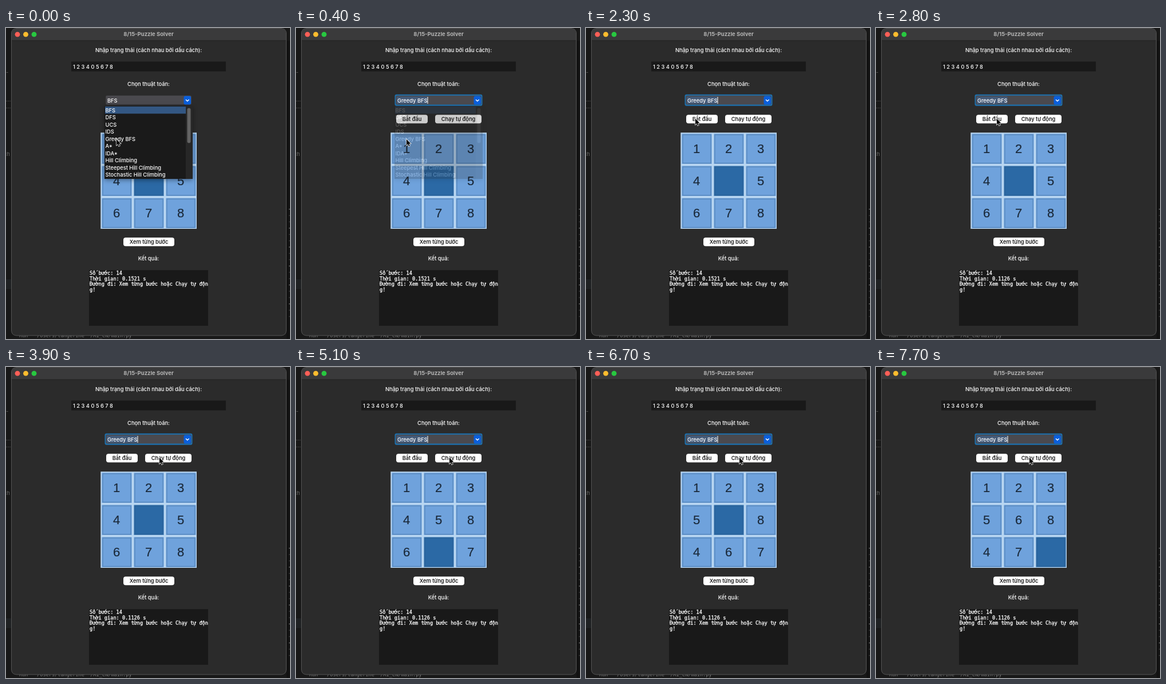
Recreate the animation shown at these times as an HTML page with a canvas. Size 496 by 542 pixels, loop 8 s.

```html
<!DOCTYPE html>
<html lang="vi">
<head>
<meta charset="utf-8">
<title>8/15-Puzzle Solver</title>
<style>
html, body { margin: 0; width: 496px; height: 542px; overflow: hidden; background: #161616; }
canvas { display: block; }
</style>
</head>
<body>
<canvas id="stage" width="496" height="542"></canvas>
<script>
const stage = document.getElementById('stage').getContext('2d');
let ctx = stage;
const LOOP = 8000, STEP = 100;
const UI = '500 9.3px Inter, "Noto Sans", sans-serif';
const BOLD = '700 9.5px Inter, "Noto Sans", sans-serif';
const MONO = '8.6px "DejaVu Sans Mono", monospace';
const DIGIT = '22px "Liberation Sans", Arial, sans-serif';
const ALGOS = ['BFS', 'DFS', 'UCS', 'IDS', 'Greedy BFS', 'A*', 'IDA*',
  'Hill Climbing', 'Steepest Hill Climbing', 'Stochastic Hill Climbing'];
const START = [1, 2, 3, 4, 0, 5, 6, 7, 8];
const GAP_PATH = [4, 5, 8, 7, 6, 3, 4, 7, 8]; // cells visited by the empty square

const clamp = (v, a = 0, b = 1) => Math.min(b, Math.max(a, v));
const ease = p => p * p * (3 - 2 * p);

function rect(x, y, w, h, color) {
  ctx.fillStyle = color;
  ctx.fillRect(x, y, w, h);
}

function round(x, y, w, h, r, color) {
  ctx.fillStyle = color;
  ctx.beginPath();
  ctx.roundRect(x, y, w, h, r);
  ctx.fill();
}

function frame(x, y, w, h, color) {
  ctx.strokeStyle = color;
  ctx.lineWidth = 1;
  ctx.strokeRect(x + .5, y + .5, w - 1, h - 1);
}

function text(str, x, baseline, { color = '#fff', font = UI, align = 'left', heavy = 0 } = {}) {
  ctx.font = font;
  ctx.fillStyle = ctx.strokeStyle = color;
  ctx.textAlign = align;
  ctx.fillText(str, x, baseline);
  if (heavy) {
    ctx.lineWidth = heavy;
    ctx.strokeText(str, x, baseline);
  }
}

function button(label, x, y, w) {
  round(x, y, w, 15, 4, '#fff');
  text(label, x + w / 2, y + 10.8, { color: '#000', align: 'center' });
}

function desktop() {
  rect(0, 0, 496, 542, '#181818');
  rect(490, 22, 6, 520, '#121212');
  rect(0, 438, 10, 17, '#1f2123');
  const dim = { color: '#5c5c5c' };
  text('-', 0, 80, dim);
  text('…', 0, 128, dim);
  text('…', 0, 140, dim);
  text('ch', -4, 223, dim);
  for (let i = 0; i < 18; i++) {
    rect(494, 315 + i * 11, 2, 1.5, i % 3 ? '#333' : '#5a5a5a');
  }
  text('Run   /Users/tangerine  /AI_CN/main.py', 23, 538.5, { color: '#777', font: MONO });
}

function windowShell() {
  round(9, 0, 481, 536.5, 9, '#545454');
  round(10, 1, 479, 534.5, 8, '#2b2b2b');
  round(10, 1, 479, 20.5, [8, 8, 0, 0], '#3a3a3b');
  rect(10, 21.5, 479, 1, '#222');
  ['#fe5f57', '#febc2e', '#28c840'].forEach((color, i) => {
    ctx.fillStyle = color;
    ctx.beginPath();
    ctx.arc(20 + i * 14.5, 11.2, 4.4, 0, 7);
    ctx.fill();
  });
  text('8/15-Puzzle Solver', 249, 13.8, { color: '#b4b4b4', font: BOLD, align: 'center' });
}

function form(t) {
  const mid = { align: 'center' };
  text('Nhập trạng thái (cách nhau bởi dấu cách):', 249, 42, mid);
  rect(114, 58.5, 270, 17, '#191919');
  text('1 2 3 4 0 5 6 7 8', 117, 70.5);
  text('Chọn thuật toán:', 249, 100.7, mid);
  button('Bắt đầu', 175, 151.3, 55);
  button('Chạy tự động', 243, 151.3, 81);
  button('Xem từng bước', 205, 365.3, 89);
  text('Kết quả:', 249, 405, mid);

  rect(145, 422, 208, 97, '#191919');
  const secs = t < 2600 ? '0.1521' : '0.1126';
  ['Số bước: 14', `Thời gian: ${secs} s`, 'Đường đi: Xem từng bước hoặc Chạy tự độn', 'g!']
    .forEach((line, i) => text(line, 146, 430 + i * 9.6, { font: MONO, heavy: .3 }));
}

function combo(t) {
  const focused = t >= 300;
  if (focused) round(172.5, 115.7, 153, 20, 3, '#1c70ae');
  round(174.3, 117.8, 149.4, 15.8, 2, '#4a494e');
  if (focused) rect(176, 119.5, 53.5, 12.5, '#445a78');
  round(310.5, 118.5, 12.5, 15, 3, '#0a5fdc');
  ctx.strokeStyle = '#fff';
  ctx.lineWidth = 1.4;
  ctx.beginPath();
  ctx.moveTo(314, 124.8);
  ctx.lineTo(316.8, 127.6);
  ctx.lineTo(319.6, 124.8);
  ctx.stroke();
  text(focused ? 'Greedy BFS' : 'BFS', 177, 129.7);
  if (focused && (t - 266) % 908 < 612) rect(229.5, 120, 1, 12, '#fff');
}

function board(t) {
  const cells = START.slice();
  const moves = clamp(Math.floor((t - 3956) / 508) + 1, 0, GAP_PATH.length - 1);
  for (let i = 0; i < moves; i++) {
    const a = GAP_PATH[i], b = GAP_PATH[i + 1];
    [cells[a], cells[b]] = [cells[b], cells[a]];
  }
  rect(165.3, 182.3, 167.7, 167.7, '#bad7f1');
  cells.forEach((n, i) => {
    const x = 167.5 + i % 3 * 56, y = 184.5 + Math.floor(i / 3) * 56;
    rect(x, y, 52, 52.5, n ? '#6fa2dc' : '#2b69a5');
    frame(x, y, 52, 52.5, n ? '#7daae0' : '#5c92c6');
    frame(x + 1, y + 1, 50, 50.5, n ? '#4d7eb2' : '#235a90');
    if (n) text(n, x + 25.6, y + 33.6, { color: '#1b2a3b', font: DIGIT, align: 'center', heavy: .2 });
  });
}

// The open list is painted once on its own layer so that it fades as a whole.
function makeList() {
  const layer = document.createElement('canvas');
  layer.width = 496;
  layer.height = 542;
  ctx = layer.getContext('2d');
  ctx.shadowColor = 'rgba(0,0,0,.4)';
  ctx.shadowBlur = 8;
  ctx.shadowOffsetY = 2;
  rect(172, 136, 154, 127, '#1a1a1a');
  ctx.shadowColor = 'transparent';
  rect(314, 136, 12, 127, '#272727');
  round(316.5, 139.5, 6, 61, 3, '#636363');
  rect(173, 136.8, 141, 12.5, '#335783');
  ALGOS.forEach((name, i) => text(name, 173.5, 146.6 + i * 12.5));
  ctx = stage;
  return layer;
}

function popup(t) {
  if (t >= 700) return;
  ctx.globalAlpha = t < 300 ? 1 : ((700 - t) / 500) ** 3;
  ctx.drawImage(list, 0, 0);
  ctx.globalAlpha = 1;
}

function pointer(t) {
  const up = ease(clamp((t - 1700) / 600));
  const right = ease(clamp((t - 2600) / 600));
  ctx.save();
  ctx.translate(193 - 2 * up + 77 * right, 194 - 36 * up);
  ctx.beginPath();
  [[0, 0], [0, 10.5], [2.4, 8.3], [4.1, 12], [5.8, 11.2], [4.2, 7.7], [7.4, 7.5]]
    .forEach(p => ctx.lineTo(...p));
  ctx.closePath();
  ctx.lineWidth = 1.4;
  ctx.strokeStyle = '#fff';
  ctx.fillStyle = '#000';
  ctx.stroke();
  ctx.fill();
  ctx.restore();
}

function draw(now) {
  const t = Math.floor(now % LOOP / STEP) * STEP;
  desktop();
  windowShell();
  form(t);
  combo(t);
  board(t);
  popup(t);
  pointer(t);
}

const list = makeList();
let begin;
function tick(now) {
  begin ??= now;
  draw(Math.max(0, now - begin));
  requestAnimationFrame(tick);
}
draw(0);
requestAnimationFrame(tick);
</script>
</body>
</html>
```
